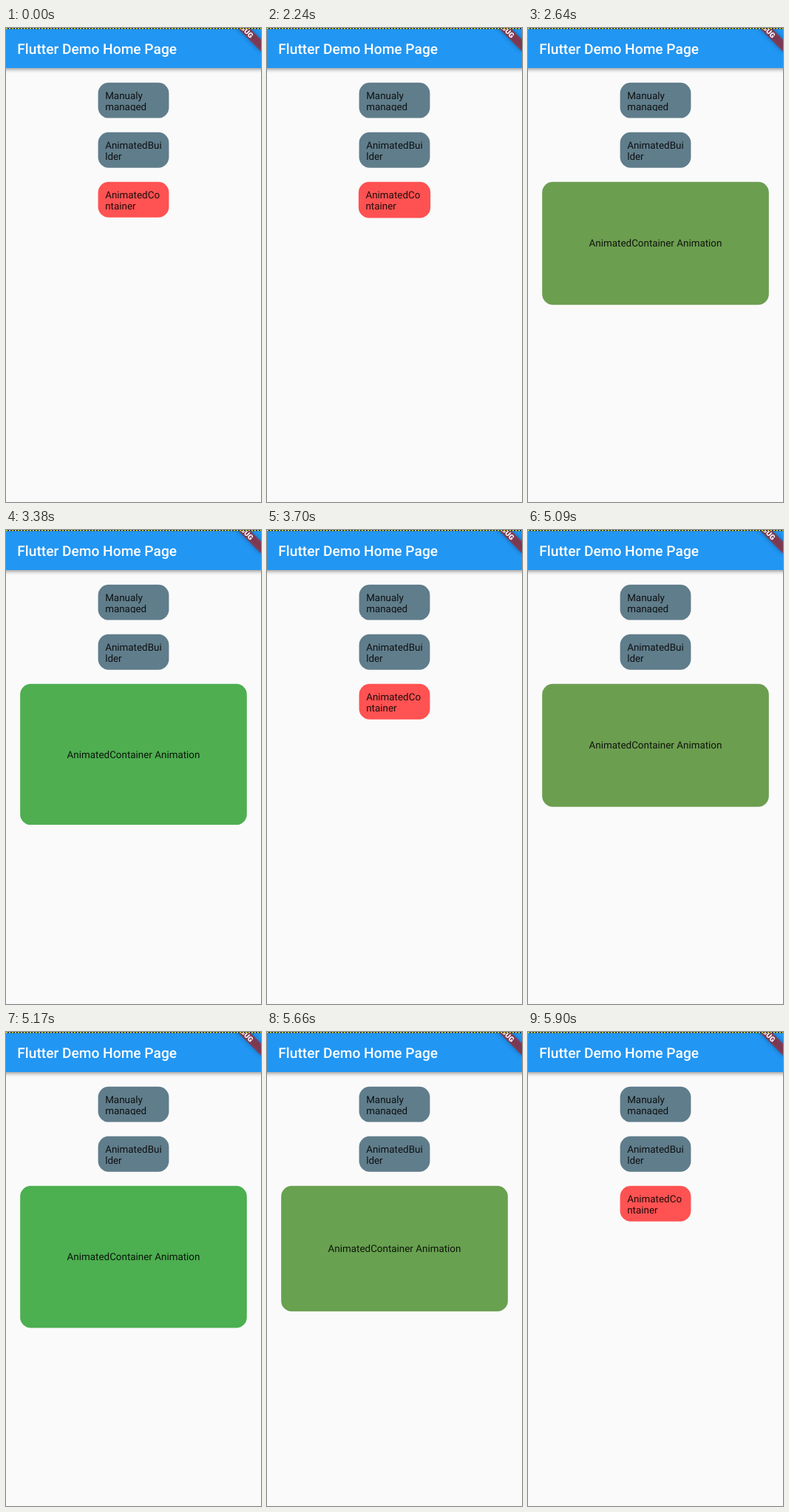
An HTML page with a canvas for the animation above (6.89 s loop, 345 px wide and 640 px high).

```html
<!DOCTYPE html>
<html lang="en">
<head>
<meta charset="utf-8">
<title>Container animations</title>
<style>
html, body { margin: 0; width: 100%; height: 100%; overflow: hidden; background: #fafafa; }
canvas { display: block; width: 345px; height: 640px; }
</style>
</head>
<body>
<canvas id="stage"></canvas>
<script>
const W = 345, H = 640, LOOP = 6890, STEP = 80;
const DP = W / 360;
const TOP = 73.7, PITCH = 70 * DP, PAD = 10 * DP;
const FONT = 14 * DP, LINE = 16 * DP;
const RED = [255, 82, 82], GREEN = [76, 175, 80], GREY = 'rgb(96,125,139)';

const canvas = document.getElementById('stage');
const ctx = canvas.getContext('2d');
const ratio = window.devicePixelRatio || 1;
canvas.width = W * ratio;
canvas.height = H * ratio;
ctx.scale(ratio, ratio);
ctx.textRendering = 'geometricPrecision';

const clamp = (v, lo, hi) => Math.min(hi, Math.max(lo, v));
const lerp = (a, b, p) => a + (b - a) * p;

const expand = k => k > 5 ? 1 : 0.005 + 0.163 * k;

// Each phase starts at a time and advances once per step.
const phases = [
  { at: 2240, value: expand },
  { at: 3380, value: k => clamp(0.99 - 0.265 * k, 0, 1) },
  { at: 4690, value: expand },
  { at: 5580, value: k => k < 1 ? 0.985 : k > 3 ? 0 : 0.845 - 0.265 * (k - 1) }
];

function progress(t) {
  let p = 0;
  for (const ph of phases) {
    if (t >= ph.at) p = ph.value(Math.floor((t - ph.at) / STEP));
  }
  return p;
}

// Breaks at spaces, and inside words that are too long for a line.
function wrap(text, max) {
  const fits = s => ctx.measureText(s).width <= max + 1;
  const lines = [];
  let line = '';
  for (const word of text.split(' ')) {
    const joined = line ? line + ' ' + word : word;
    if (fits(joined)) { line = joined; continue; }
    if (line) lines.push(line);
    line = '';
    for (const ch of word) {
      if (line && !fits(line + ch)) { lines.push(line); line = ''; }
      line += ch;
    }
  }
  lines.push(line);
  return lines;
}

function box(row, label, w, h, color) {
  const x = (W - w) / 2, y = TOP + row * PITCH;
  ctx.fillStyle = color;
  ctx.beginPath();
  ctx.roundRect(x, y, w, h, 15 * DP);
  ctx.fill();

  const iw = w - 2 * PAD, ih = h - 2 * PAD;
  ctx.save();
  ctx.beginPath();
  ctx.rect(x + PAD - 1, y + PAD, iw + 2, ih);
  ctx.clip();
  ctx.font = `${FONT}px Roboto, sans-serif`;
  ctx.fillStyle = 'rgba(0,0,0,0.87)';
  const lines = wrap(label, iw);
  const tw = lines.length > 1 ? iw : ctx.measureText(label).width;
  const tx = x + (w - tw) / 2;
  const ty = y + PAD + Math.max(0, (ih - lines.length * LINE) / 2) + 12.4;
  lines.forEach((s, i) => ctx.fillText(s, tx, ty + i * LINE));
  ctx.restore();
}

function appBar() {
  ctx.save();
  ctx.shadowColor = 'rgba(0,0,0,0.4)';
  ctx.shadowBlur = 5 * ratio;
  ctx.shadowOffsetY = 2 * ratio;
  ctx.fillStyle = '#2196f3';
  ctx.fillRect(-10, -10, W + 20, 64);
  ctx.restore();
  ctx.font = `500 ${20 * DP}px Roboto, sans-serif`;
  ctx.fillStyle = '#fff';
  ctx.fillText('Flutter Demo Home Page', 16 * DP, 35.4);
}

function banner() {
  ctx.save();
  ctx.translate(W, -22.4);
  ctx.rotate(Math.PI / 4);
  ctx.scale(DP, DP);
  ctx.shadowColor = 'rgba(0,0,0,0.5)';
  ctx.shadowBlur = 6 * ratio;
  ctx.fillStyle = 'rgba(183,28,28,0.63)';
  ctx.fillRect(-40, 28, 80, 12);
  ctx.shadowColor = 'transparent';
  ctx.font = '900 10.2px Roboto, sans-serif';
  ctx.textAlign = 'center';
  ctx.fillStyle = '#fff';
  ctx.fillText('DEBUG', 0, 37.6);
  ctx.restore();
}

function topStripe() {
  ctx.fillStyle = '#222';
  ctx.fillRect(0, 0, W, 1.3);
  ctx.fillStyle = '#f2e21c';
  for (let x = 0; x < W; x += 4) ctx.fillRect(x, 0, 2, 1.3);
}

function draw(t) {
  ctx.fillStyle = '#fafafa';
  ctx.fillRect(0, 0, W, H);
  appBar();
  banner();
  topStripe();

  const p = progress(t);
  const mix = RED.map((c, i) => Math.round(lerp(c, GREEN[i], p)));
  box(0, 'Manualy managed Animation', 100 * DP, 50 * DP, GREY);
  box(1, 'AnimatedBuilder Animation', 100 * DP, 50 * DP, GREY);
  box(2, 'AnimatedContainer Animation',
    Math.min(320, lerp(100, 400, p)) * DP, lerp(50, 200, p) * DP, `rgb(${mix})`);
}

const start = performance.now();
function tick() {
  draw((performance.now() - start) % LOOP);
  requestAnimationFrame(tick);
}
tick();
</script>
</body>
</html>
```
